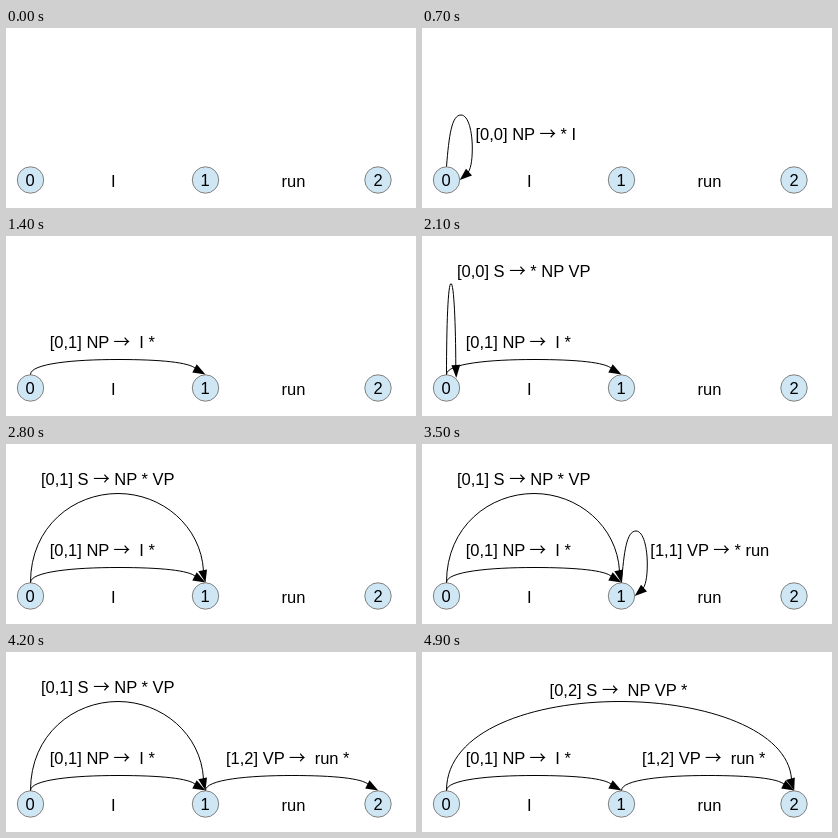
An HTML page that plays this animation: 410 px wide and 180 px high, repeating every 5.6 s.

```html
<!DOCTYPE html>
<html lang="en">
<head>
<meta charset="utf-8">
<title>Chart parsing</title>
<style>
  html, body { margin: 0; width: 100%; height: 100%; overflow: hidden; background: #fff; }
  svg { display: block; width: 410px; height: 180px; }
  text { font: 16.5px "Liberation Sans", Arial, sans-serif; white-space: pre; }
  .to { font-family: "Noto Sans CJK JP", "Noto Sans CJK SC", sans-serif; }
  circle { fill: #cfe7f5; stroke: #808080; }
  .mid { text-anchor: middle; }
  .line { fill: none; stroke: #000; }
  .edge { visibility: hidden; animation: 5600ms step-end infinite; }

  #np-predict { animation-name: np-predict; }
  #np-done { animation-name: np-done; }
  #s-predict { animation-name: s-predict; }
  #s-half { animation-name: s-half; }
  #vp-predict { animation-name: vp-predict; }
  #vp-done { animation-name: vp-done; }
  #s-done { animation-name: s-done; }

  /* eight equal steps of 12.5% */
  @keyframes np-predict { 12.5% { visibility: visible } 25% { visibility: hidden } }
  @keyframes np-done { 25%, 100% { visibility: visible } }
  @keyframes s-predict { 37.5% { visibility: visible } 50% { visibility: hidden } }
  @keyframes s-half { 50% { visibility: visible } 87.5% { visibility: hidden } }
  @keyframes vp-predict { 62.5% { visibility: visible } 75% { visibility: hidden } }
  @keyframes vp-done { 75%, 100% { visibility: visible } }
  @keyframes s-done { 87.5%, 100% { visibility: visible } }
</style>
</head>
<body>
<svg viewBox="0 0 410 180">
  <defs>
    <!-- arcs and loops start at the top of a node at x = 0 -->
    <g id="arc">
      <path class="line" d="M0 138.5C0 127.5 43.5 123.5 87.5 123.5C131 123.5 159 126.5 165 132.5"/>
      <path d="M175 138.5L161.8 136.5L166.2 128.3Z"/>
    </g>
    <g id="loop">
      <path class="line" d="M0 138.5C2.5 108 5 87 14.5 87C22 87 25.8 104 25.8 120C25.8 134 24 142 20.5 146"/>
      <path d="M13.2 152L19.5 140.8L25.5 147.6Z"/>
    </g>
  </defs>

  <g id="nodes">
    <circle cx="24.5" cy="152" r="13.2"/>
    <circle cx="199.5" cy="152" r="13.2"/>
    <circle cx="372" cy="152" r="13.2"/>
    <g class="mid">
      <text x="24" y="158">0</text>
      <text x="199" y="158">1</text>
      <text x="372" y="158">2</text>
      <text x="107.3" y="159">I</text>
      <text x="287.5" y="159">run</text>
    </g>
  </g>

  <g id="np-predict" class="edge">
    <use href="#loop" x="24.5"/>
    <text x="53.5" y="112">[0,0] NP <tspan class="to">→</tspan> * I</text>
  </g>

  <g id="np-done" class="edge">
    <use href="#arc" x="24.5"/>
    <text x="43.7" y="112">[0,1] NP <tspan class="to">→</tspan>  I *</text>
  </g>

  <g id="s-predict" class="edge">
    <path class="line" d="M24.5 138.5C24.5 90 26 47.5 29 47.5C32 47.5 33.7 90 33.8 130"/>
    <path d="M34.3 142L29.4 129.2L38.2 128.8Z"/>
    <text x="34.9" y="41">[0,0] S <tspan class="to">→</tspan> * NP VP</text>
  </g>

  <g id="s-half" class="edge">
    <path class="line" d="M24.5 138.5C24.5 82 68 49.5 112 49.5C156 49.5 195 82 197.5 127"/>
    <path d="M199.5 138.5L192.3 127.2L201 125.5Z"/>
    <text x="34.9" y="41">[0,1] S <tspan class="to">→</tspan> NP * VP</text>
  </g>

  <g id="vp-predict" class="edge">
    <use href="#loop" x="199.5"/>
    <text x="228.3" y="112">[1,1] VP <tspan class="to">→</tspan> * run</text>
  </g>

  <g id="vp-done" class="edge">
    <use href="#arc" transform="translate(199.5) scale(.987 1)"/>
    <text x="220" y="112">[1,2] VP <tspan class="to">→</tspan>  run *</text>
  </g>

  <g id="s-done" class="edge">
    <path class="line" d="M24.5 138.5C24.5 78 112 49.5 198 49.5C284 49.5 366 78 369.5 127"/>
    <path d="M372.2 138.5L364 128L372.8 125.6Z"/>
    <text x="127.6" y="44">[0,2] S <tspan class="to">→</tspan>  NP VP *</text>
  </g>
</svg>
</body>
</html>
```
